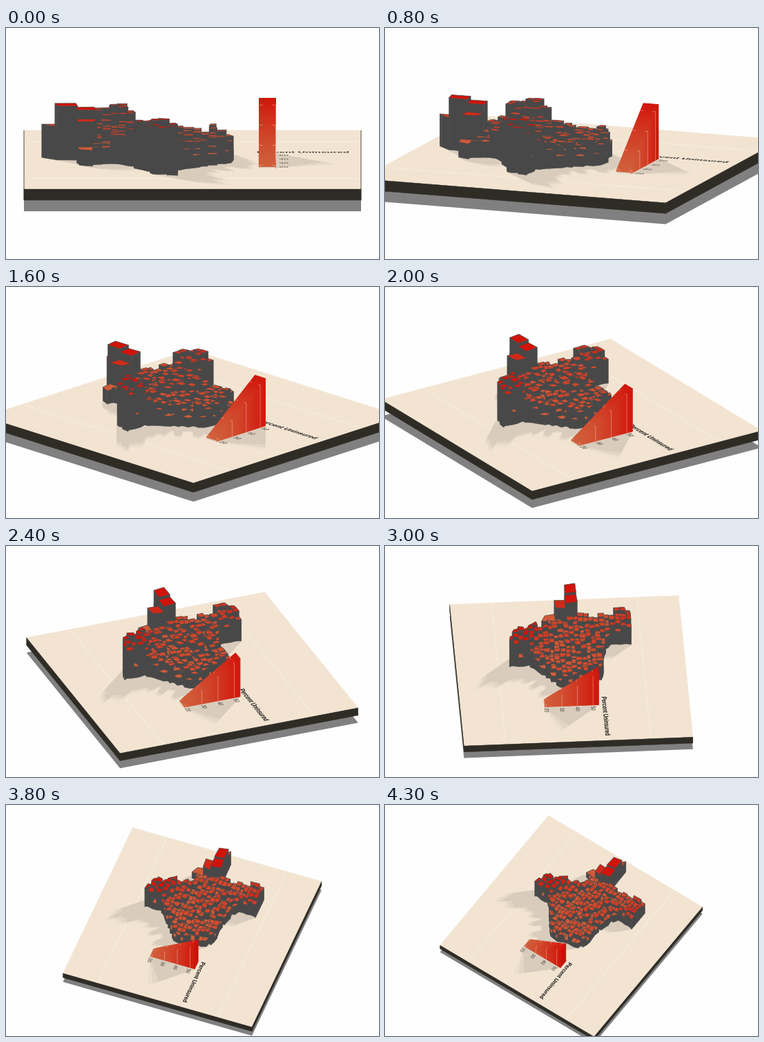
Animation, 540 px wide and 334 px high, one loop 4400 ms. Source, as a matplotlib script:

```python
import numpy as np
import matplotlib.pyplot as plt
from matplotlib.animation import FuncAnimation
from matplotlib.collections import LineCollection, PolyCollection
from matplotlib.patches import PathPatch
from matplotlib.path import Path
from matplotlib.textpath import TextPath

W, H, FRAMES, STEP = 540, 334, 44, 100
PAPER, SLAB, DROP, WALL = "#f3e4d2", "#2f2c26", "#808080", "#484848"
LOW, HIGH = np.array([0.82, 0.37, 0.23]), np.array([0.82, 0.08, 0.04])
SUN = np.array([-1.06, 1.04])       # shadow shift on the ground per unit of height
SOFT = [(1, "#ecdfcd"), (0.9, "#e3d6c5"), (0.78, "#d9ccbc")]   # penumbra layers
THICK = 0.0333
rng = np.random.default_rng(11)

# State outline, longitude and latitude
STATE = np.array([
    (-106.6, 31.95), (-103.05, 32.0), (-103.05, 36.5), (-100, 36.5), (-100, 34.55),
    (-98.5, 34.1), (-97, 33.8), (-95.5, 33.9), (-94.4, 33.55), (-94.05, 33),
    (-94.05, 31.95), (-93.55, 31.1), (-93.7, 30.1), (-94.7, 29.35), (-95.9, 28.6),
    (-97.1, 27.9), (-97.4, 26.9), (-97.15, 25.9), (-98.2, 26.05), (-99.1, 26.4),
    (-99.5, 27.5), (-100.3, 28.3), (-100.7, 29.1), (-101.4, 29.77), (-102.3, 29.88),
    (-102.8, 29.35), (-103.15, 28.98), (-104, 29.3), (-104.5, 29.65), (-104.9, 30.6),
    (-106.4, 31.75)])


def ground(lonlat):
    """Map position: u runs north, v runs east."""
    lon, lat = np.asarray(lonlat).T
    return np.column_stack([-0.272 + 0.0511 * (lat - 25.84), -0.449 + 0.0436 * (lon + 106.65)])


def nearest(p):
    """Closest point on the outline and its distance."""
    a, b = STATE, np.roll(STATE, -1, axis=0)
    e = b - a
    t = np.clip(((p - a) * e).sum(1) / (e * e).sum(1), 0, 1)
    q = a + t[:, None] * e
    d = np.hypot(*(q - p).T)
    return q[d.argmin()], d.min()


def step(x):
    return 1 / (1 + np.exp(-x / 0.25))


def height(lon, lat, noise):
    south = 28.2 - 0.5 * (max(lon, -101.8) + 98.6) - lat
    h = 0.054 + 0.014 * step(-97.5 - lon) + 0.013 * max(lat - 34, 0)
    if lon < -103 and lat < 32.3:
        h = 0.14
    elif lon > -102.3:
        h += 0.085 * step(south)
    h += noise
    if lon < -106:
        h = 0.1
    if -103.9 < lon < -102.1 and lat < 30.5:
        h = 0.048 + 0.3 * noise
    if lon > -98 and 26.5 < lat < 27.1:
        h = 0.05
    if abs(lon + 95) < 0.27 and abs(lat - 33.2) < 0.24:
        h = 0.088
    return h


def counties(lons, lats, wobble):
    inside = Path(STATE)
    node = {}
    for i, x in enumerate(lons):
        for j, y in enumerate(lats):
            p = np.array([x, y]) + rng.uniform(-wobble, wobble, 2)
            q, d = nearest(p)
            node[i, j] = q if d < 0.2 or not inside.contains_point(p) else p
    cells = []
    for i in range(len(lons) - 1):
        for j in range(len(lats) - 1):
            mid = np.array([lons[i] + lons[i + 1], lats[j] + lats[j + 1]]) / 2
            if inside.contains_point(mid):
                quad = [node[i, j], node[i + 1, j], node[i + 1, j + 1], node[i, j + 1]]
                cells.append((ground(quad), height(*mid, rng.uniform(-0.024, 0.028))))
    return cells


def tint(f):
    return LOW + (HIGH - LOW) * np.clip(f, 0, 1) ** 1.25


def lift(p, z):
    p = np.asarray(p, float)
    return np.column_stack([p, np.broadcast_to(z, len(p))])


def cast(p, hs, reach):
    """Ground shadow of a four-sided block: swept sides and its shifted top."""
    q = p + reach * np.asarray(hs)[:, None] * SUN
    sides = [np.array([p[i], p[(i + 1) % 4], q[(i + 1) % 4], q[i]]) for i in range(4)]
    return [lift(s, 0) for s in sides + [q]]


class Camera:
    def __init__(self, n):
        a = np.radians(2.98 * (n - 1 + np.exp(-n)))
        turn, tilt = a - np.pi / 2, np.radians(40 - 30 * np.cos(a))
        self.sin, self.cos = np.sin(turn), np.cos(turn)
        self.down, self.up = np.sin(tilt), np.cos(tilt)
        self.scale = 1 / (0.00205 + 0.001025 * (1 - np.cos(a)))

    def depth(self, p):
        return p[:, 0] * self.sin + p[:, 1] * self.cos

    def __call__(self, p):
        p = np.asarray(p, float)
        x = p[:, 0] * self.cos - p[:, 1] * self.sin
        y = self.depth(p) * self.down + (0.046 - p[:, 2]) * self.up
        return np.column_stack([269.7 + self.scale * x, 168.4 + self.scale * y])

    def walls(self, p, z0, z1):
        """Sides of an upright prism that face the viewer."""
        q = np.roll(p, -1, axis=0)
        sign = np.sign((p[:, 0] * q[:, 1] - q[:, 0] * p[:, 1]).sum())
        e = q - p
        face = sign * (e[:, 1] * self.sin - e[:, 0] * self.cos)
        return [self(np.vstack([lift([a, b], z0), lift([b, a], z1)]))
                for a, b, f in zip(p, q, face) if f > -1e-6]


CELLS = counties([-106.7, -105.6, -104.3, -102.95], [28.7, 30.1, 31.1, 32.1], 0.15)
CELLS += counties(np.arange(-103.05, -93.2, 0.56), np.linspace(25.8, 36.5, 25), 0.11)
TOPS = [tint((h - 0.035) / 0.115) for _, h in CELLS]
SQUARE = np.array([(-0.5, -0.5), (0.5, -0.5), (0.5, 0.5), (-0.5, 0.5)])

# Legend wedge
U0, U1, V0, V1, PEAK = -0.13, 0.104, 0.197, 0.246, 0.169
TICKS = U0 + (U1 - U0) * (0.025 + 0.29 * np.arange(4))
WEDGE = np.array([(U0, V0), (U1, V0), (U1, V1), (U0, V1)])


def rise(u):
    return 0.003 + (PEAK - 0.003) * (u - U0) / (U1 - U0)


BLOCKS = [(p, [h] * 4) for p, h in CELLS] + [(WEDGE, rise(WEDGE[:, 0]))]
SHADOWS = np.array([s for reach, _ in SOFT for p, hs in BLOCKS for s in cast(p, hs, reach)])
TONES = [tone for _, tone in SOFT for _ in range(5 * len(BLOCKS))]


def flat_text(s, u, v, size, weight):
    path = TextPath((0, 0), s, size=100, prop=dict(family="Liberation Sans", weight=weight))
    g = path.vertices * size / 100
    uv = np.column_stack([u - 0.35 * size + g[:, 1], v + g[:, 0]])
    return lift(uv, 0), path.codes


TEXTS = [flat_text("Percent Uninsured", 0.131, 0.191, 0.0309, "bold")]
TEXTS += [flat_text(str(20 + 10 * i), u, 0.257, 0.0256, "normal") for i, u in enumerate(TICKS)]

fig = plt.figure(figsize=(W / 100, H / 100), dpi=100, facecolor="#fefefe")
ax = fig.add_axes([0, 0, 1, 1])
ax.set_xlim(0, W)
ax.set_ylim(H, 0)
ax.axis("off")

base = ax.add_collection(PolyCollection([], zorder=1))
rules = ax.add_collection(LineCollection([], colors="#f9efe4", linewidths=0.6, zorder=2))
shade = ax.add_collection(PolyCollection([], facecolors=TONES, edgecolors=TONES,
                                         linewidths=0.4, zorder=3))
words = [ax.add_patch(PathPatch(Path([(0, 0)]), fc="#111111" if i == 0 else "#3a3733",
                                lw=0, zorder=4)) for i in range(len(TEXTS))]
blocks = ax.add_collection(PolyCollection([], zorder=5))
marks = ax.add_collection(LineCollection([], colors=(1, 0.9, 0.85, 0.45), linewidths=0.6, zorder=6))


def paint(coll, items):
    polys, faces, edges, widths = zip(*items)
    coll.set_verts(polys)
    coll.set_facecolor(faces)
    coll.set_edgecolor(edges)
    coll.set_linewidth(widths)


def wedge(cam):
    items = []
    us = np.linspace(U0, U1, 41)
    for a, b in zip(us[:-1], us[1:]):
        c = tint((a - U0) / (U1 - U0))
        za, zb = rise(a), rise(b)
        side = cam([(a, V1, 0), (b, V1, 0), (b, V1, zb), (a, V1, za)])
        top = cam([(a, V0, za), (b, V0, zb), (b, V1, zb), (a, V1, za)])
        items += [(side, c, c, 0.7), (top, c, c, 0.7)]
    if cam.sin > 0:
        c = HIGH * 0.95
        items.append((cam([(U1, V0, 0), (U1, V1, 0), (U1, V1, PEAK), (U1, V0, PEAK)]), c, c, 0.3))
    return items


def draw(n):
    cam = Camera(n)
    items = [(cam(lift(SQUARE, -2 * THICK)), DROP, DROP, 0),
             (cam(lift(SQUARE, 0)), PAPER, PAPER, 0.3)]
    items += [(w, SLAB, SLAB, 0.3) for w in cam.walls(SQUARE, -THICK, 0)]
    paint(base, items)
    rules.set_segments([cam([(u, -0.49, 0), (u, 0.49, 0)]) for u in (-0.317, 0.317)])
    shade.set_verts(cam(SHADOWS.reshape(-1, 3)).reshape(-1, 4, 2))
    for patch, (pts, codes) in zip(words, TEXTS):
        patch.set_path(Path(cam(pts), codes))

    items = []
    for i in np.argsort([cam.depth(p).mean() for p, _ in CELLS]):
        p, h = CELLS[i]
        items += [(w, WALL, WALL, 0.3) for w in cam.walls(p, 0, h)]
        items.append((cam(lift(p, h)), TOPS[i], WALL, 0.5))
    paint(blocks, items + wedge(cam))

    bit = 0.2 * (V1 - V0)
    lines = []
    for u in TICKS:
        z = rise(u)
        lines += [cam([(u, V1, 0), (u, V1, z), (u, V1 - bit, z)]),
                  cam([(u, V0, z), (u, V0 + bit, z)])]
    marks.set_segments(lines)
    return [base, rules, shade, *words, blocks, marks]


anim = FuncAnimation(fig, draw, frames=FRAMES, interval=STEP, repeat=True)
plt.show()
```
